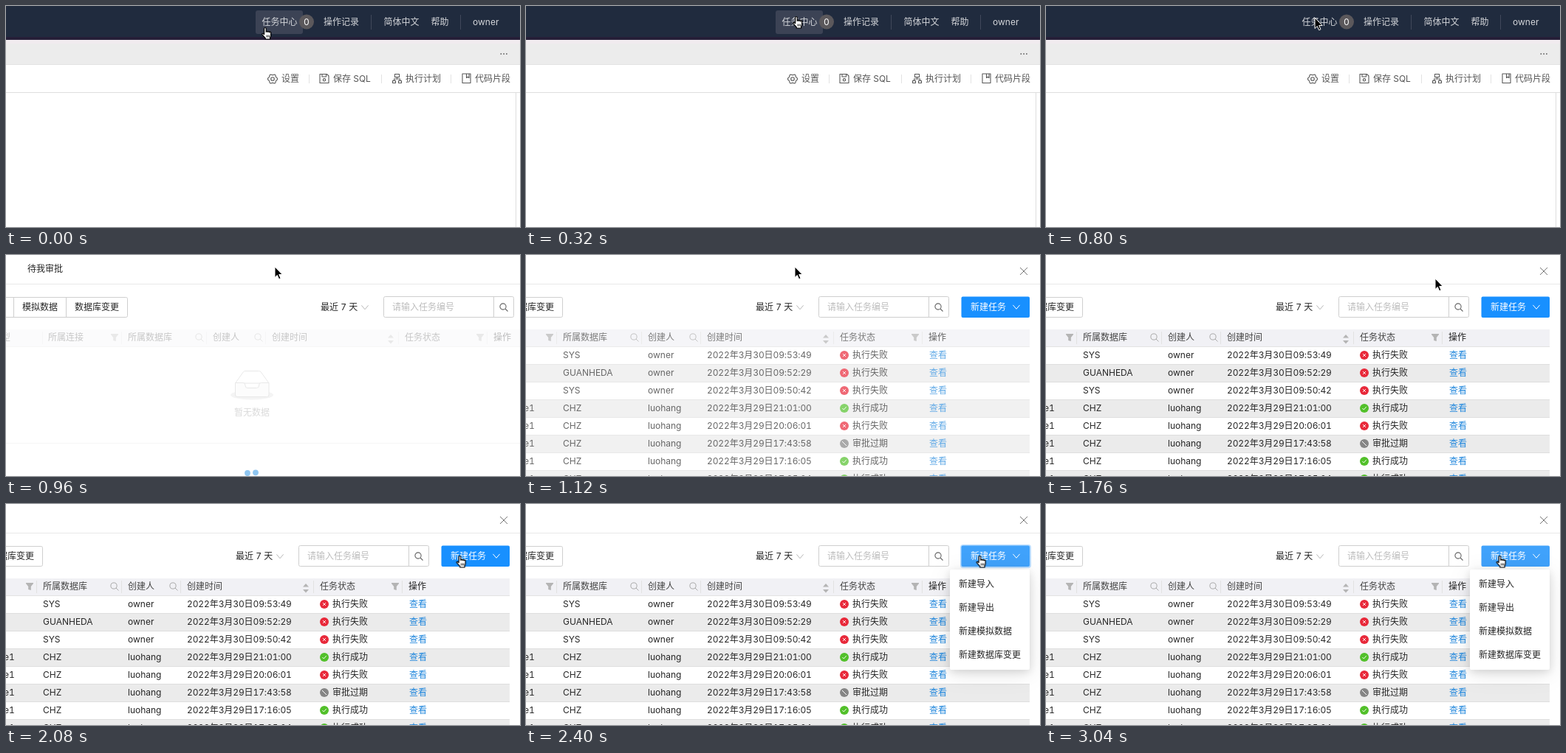
An HTML page that plays this animation: 696 px wide and 300 px high, repeating every 3.2 s.

```html
<!DOCTYPE html>
<html lang="zh-CN">
<head>
<meta charset="utf-8">
<title>任务中心</title>
<style>
html, body { margin: 0; width: 100%; height: 100%; overflow: hidden; background: #fff; }
svg { display: block; }
text { font: 12px Inter, "Noto Sans CJK SC", "Noto Sans CJK", sans-serif; font-feature-settings: "tnum"; }
.ln { fill: none; stroke: #595959; stroke-width: 1.1; stroke-linejoin: round; }
.box { fill: #fff; stroke: #cfcfcf; }
.nav { fill: #d3d5d9; }
.tool { fill: #555; }
.dark { fill: #262626; }
.head { fill: #444; }
.date { letter-spacing: -.1px; }

.anim { animation: 3.2s step-end infinite; }
#hover { animation-name: hover; }
#tasks { animation-name: tasks; }
#page { animation-name: scroll; }
#table { animation-name: fade; }
#rows { animation-name: rows; }
#empty { animation-name: empty; }
#ring { animation-name: ring; }
#new { fill: #1890ff; animation-name: button; }
#menu { transform-origin: 628px 89px; animation-name: menu; }
#panel { fill: #fff; filter: drop-shadow(0 3px 6px rgba(0,0,0,.12)) drop-shadow(0 5px 14px rgba(0,0,0,.1)); }
#hand { animation-name: hand; }
#arrow { animation-name: arrow; }

@keyframes hover { 0% { opacity: 1 } 25%, 100% { opacity: 0 } }
@keyframes tasks { 0% { opacity: 0 } 30%, 100% { opacity: 1 } }
@keyframes scroll { 0% { transform: translate(115px, 0) } 35%, 100% { transform: none } }
@keyframes fade { 0% { opacity: .3 } 35% { opacity: .7 } 40%, 100% { opacity: 1 } }
@keyframes rows { 0% { opacity: 0 } 35%, 100% { opacity: 1 } }
@keyframes empty { 0% { opacity: 1 } 35%, 100% { opacity: 0 } }
@keyframes ring {
  0% { opacity: 0 } 70% { opacity: .35 } 75% { opacity: .3 } 80% { opacity: .2 }
  85% { opacity: .12 } 90% { opacity: .06 } 95%, 100% { opacity: 0 }
}
@keyframes button { 0% { fill: #1890ff } 70% { fill: #2c9cff } 75%, 100% { fill: #40a2fb } }
@keyframes menu {
  0% { opacity: 0; transform: scaleY(.8) }
  70% { opacity: .6; transform: scaleY(.93) }
  75%, 100% { opacity: 1; transform: none }
}
@keyframes hand {
  0% { opacity: 1; transform: translate(346px, 29px) }
  5% { opacity: 1; transform: translate(370px, 16px) }
  10% { opacity: 1; transform: translate(361px, 14px) }
  25% { opacity: 0; transform: translate(361px, 14px) }
  65%, 100% { opacity: 1; transform: translate(609.5px, 70px) }
}
@keyframes arrow {
  0% { opacity: 0; transform: translate(364px, 16px) }
  25% { opacity: 1; transform: translate(364px, 16px) }
  55% { opacity: 1; transform: translate(527px, 32px) }
  60% { opacity: 1; transform: translate(597px, 60px) }
  65%, 100% { opacity: 0; transform: translate(597px, 60px) }
}
</style>
</head>
<body>
<svg width="696" height="300" viewBox="0 0 696 300">
  <defs>
    <g id="lens" fill="none"><circle cx="-1" cy="-1" r="4.1"/><path d="M2 2 5.5 5.5"/></g>
    <path id="funnel" d="M-5-5H5V-4L1.800 0V5L-1.800 4V0L-5-4Z"/>
    <path id="chevron" d="M-4.600-2.600 0 2.800 4.600-2.600" fill="none"/>
    <g id="fail"><circle r="6" fill="#e8293a"/><path d="M-2-2 2 2M2-2-2 2" stroke="#fff" stroke-width=".9"/></g>
    <g id="ok"><circle r="6" fill="#52c02a"/><path d="M-2.600 0-.7 2 2.700-1.900" fill="none" stroke="#fff" stroke-width=".9"/></g>
    <g id="late"><circle r="6" fill="#858585"/><path d="M-3-3 3 3" stroke="#fff"/></g>
  </defs>

  <!-- editor -->
  <g>
    <path fill="#202b3e" d="M0 0H696V43H0Z"/>
    <path fill="#261f38" d="M0 42H696V46H0Z"/>
    <path fill="#f1ebef" d="M0 46H696V52H0Z"/>
    <path fill="#ececec" d="M0 51H696V80H0Z"/>
    <path stroke="#e3e3e3" d="M0 79.500H696"/>
    <path stroke="#dedede" d="M0 117.500H696M690.500 118V300"/>
    <rect id="hover" class="anim" x="338" y="6" width="64" height="32" rx="3" fill="#3c4355"/>
    <g class="nav">
      <text x="346.5" y="26">任务中心</text><text x="430" y="26">操作记录</text>
      <text x="511.5" y="26">简体中文</text><text x="575.5" y="26">帮助</text>
      <text x="632" y="26">owner</text>
    </g>
    <circle cx="407" cy="21.5" r="10" fill="#5b585b"/>
    <text x="407" y="26" text-anchor="middle" fill="#fff">0</text>
    <path stroke="#40485a" d="M494.500 12V32M615.500 12V32"/>
    <g fill="#666"><circle cx="670.3" cy="65" r=".9"/><circle cx="674.1" cy="65" r=".9"/><circle cx="677.9" cy="65" r=".9"/></g>
    <path stroke="#e3e3e3" d="M410.500 93V105M508.500 93V105M602.500 93V105"/>
    <g class="tool">
      <text x="373" y="103">设置</text><text x="443" y="103">保存 SQL</text>
      <text x="541" y="103">执行计划</text><text x="635" y="103">代码片段</text>
    </g>
    <g class="ln">
      <polygon id="gear"/><circle cx="361" cy="99" r="2.3"/>
      <path d="M425 92.500H434.500L437 95V104.500H425ZM428 92.500V96H433.500V92.500"/><circle cx="431" cy="100.3" r="1.7"/>
      <path d="M526.500 92.500H532.500V96.500H526.500ZM529.500 96.500V99M525.500 101V99H533.500V101M523.500 101.500H527.500V104.500H523.500ZM531.500 101.500H535.500V104.500H531.500Z"/>
      <path d="M618 92H629V104.500H618ZM623.500 92V97.500L625.200 96.200 627 97.500V92"/>
    </g>
  </g>

  <!-- task list -->
  <g id="tasks" class="anim">
    <path fill="#fff" d="M0 0H696V300H0Z"/>
    <path stroke="#e8e8e8" d="M0 39.500H696"/>
    <g id="page" class="anim">
      <text class="dark" x="-86" y="23">待我审批</text>
      <path stroke="#777" d="M669 17 679 27M679 17 669 27"/>
      <rect class="box" x="-300" y="57.5" width="349.5" height="27" rx="2"/>
      <path stroke="#cfcfcf" d="M-104.500 57V85M-33.500 57V85"/>
      <g class="dark">
        <text x="-93" y="75">模拟数据</text><text x="-22" y="75">数据库变更</text>
        <text x="311" y="75">最近 7 天</text>
      </g>
      <use href="#chevron" x="371" y="71" stroke="#b5b5b5"/>
      <rect class="box" x="396.5" y="56.5" width="176" height="28" rx="2"/>
      <path stroke="#cfcfcf" d="M545.500 57V84"/>
      <text x="408" y="75" fill="#bdbdbd">请输入任务编号</text>
      <use href="#lens" x="559" y="71" stroke="#666" stroke-width="1.1"/>
      <rect id="ring" class="anim" x="588" y="55" width="96" height="32" rx="4" fill="#1890ff"/>
      <rect id="new" class="anim" x="589.5" y="56.5" width="92.5" height="28.5" rx="2"/>
      <text x="602" y="75" fill="#fff">新建任务</text>
      <use href="#chevron" x="664" y="70.5" stroke="#fff"/>

      <g id="table" class="anim">
        <path fill="#f1f1f5" d="M-200 101H682V124H-200Z"/>
        <path stroke="#e2e2e2" d="M-200 124.500H682M-65.500 104V121M41.500 104V121M156.500 104V121M236.500 104V121M416.500 104V121M536.500 104V121"/>
        <g class="head">
          <text x="-133" y="116">类型</text><text x="-58" y="116">所属连接</text>
          <text x="50" y="116">所属数据库</text><text x="165" y="116">创建人</text>
          <text x="245" y="116">创建时间</text><text x="425" y="116">任务状态</text>
          <text x="545" y="116" fill="#222" font-weight="500" style="font-weight:500">操作</text>
        </g>
        <g fill="#b4b4b4">
          <use href="#funnel" x="32" y="112"/><use href="#funnel" x="527" y="112"/>
          <path d="M402 112.500 406 108 410 112.500ZM402 116 406 120.500 410 116Z"/>
        </g>
        <g stroke="#aaa"><use href="#lens" x="147" y="112"/><use href="#lens" x="227" y="112"/></g>
        <g id="rows" class="anim"></g>
      </g>
    </g>

    <g id="empty" class="anim">
      <ellipse cx="333" cy="190" rx="29" ry="6.5" fill="#f4f4f4"/>
      <g fill="#fff" stroke="#e8e8e8">
        <path d="M310.500 174 321.500 158.500Q322.500 157.500 324 157.500H342.500Q344 157.500 345 158.500L356 174Z"/>
        <path fill="#fcfcfc" d="M310.500 173.500H321Q324 173.500 324 177T327 180.500H339.500Q342.500 180.500 342.500 177T345.500 173.500H356V190Q356 192.500 353.500 192.500H313Q310.500 192.500 310.500 190Z"/>
      </g>
      <text x="309" y="218" fill="#dadada">暂无数据</text>
      <path stroke="#f5f5f5" d="M0 255.500H696"/>
      <g fill="#8fc6f1"><circle cx="327" cy="296" r="3.9"/><circle cx="338" cy="295.3" r="3.9"/></g>
    </g>

    <g id="menu" class="anim">
      <rect id="panel" x="574" y="89" width="108" height="136" rx="2"/>
      <g class="dark">
        <text x="586" y="113">新建导入</text><text x="586" y="145">新建导出</text>
        <text x="586" y="177">新建模拟数据</text><text x="586" y="209">新建数据库变更</text>
      </g>
    </g>
  </g>

  <!-- pointers -->
  <path id="arrow" class="anim" fill="#000" stroke="#fff" d="M0 0V14.500L3.300 11.400 5.600 16.700 8 15.700 5.700 10.500H10.200Z"/>
  <g id="hand" class="anim">
    <path fill="#fff" stroke="#000" stroke-width="1.2" stroke-linejoin="round" d="M3.600 9.500V1.800a1.300 1.300 0 0 1 2.600 0V6.300a1.100 1.100 0 0 1 2.200 .2a1.100 1.100 0 0 1 2.200 .4a1 1 0 0 1 2 .5V11q0 1.500-1 3V16H5.200V14.600L1 9.800q-.8-1.600 1-1.400Z"/>
    <path stroke="#000" stroke-width=".8" d="M6.900 10.500V13.500M8.700 10.500V13.500M10.400 10.500V13.500"/>
  </g>
</svg>
<script>
const labels = { fail: '执行失败', ok: '执行成功', late: '审批过期' };
const tasks = [
  ['', 'SYS', 'owner', '30日09:53:49', 'fail'],
  ['', 'GUANHEDA', 'owner', '30日09:52:29', 'fail'],
  ['', 'SYS', 'owner', '30日09:50:42', 'fail'],
  ['e1', 'CHZ', 'luohang', '29日21:01:00', 'ok'],
  ['e1', 'CHZ', 'luohang', '29日20:06:01', 'fail'],
  ['e1', 'CHZ', 'luohang', '29日17:43:58', 'late'],
  ['e1', 'CHZ', 'luohang', '29日17:16:05', 'ok'],
  ['e1', 'CHZ', 'luohang', '29日17:05:04', 'ok']
];
const cell = (x, y, str, kind = 'dark') => `<text class="${kind}" x="${x}" y="${y}">${str}</text>`;

document.getElementById('rows').innerHTML = tasks.map(([conn, db, user, time, state], i) => {
  const top = 124 + i * 24, y = top + 16;
  const stripe = i % 2
    ? `<path fill="#ebebeb" d="M-200 ${top}H682V${top + 24}H-200Z"/>
       <path stroke="#dedede" d="M-200 ${top + .5}H682M-200 ${top + 24.5}H682"/>`
    : '';
  return stripe + cell(-3, y, conn) + cell(50, y, db) + cell(165, y, user) +
    cell(245, y, '2022年3月' + time, 'dark date') +
    `<use href="#${state}" x="431" y="${top + 12}"/>` +
    cell(442, y, labels[state]) +
    `<text x="546" y="${y}" fill="#1f86dc">查看</text>`;
}).join('');

const gear = Array.from({ length: 48 }, (_, i) => {
  const a = i * Math.PI / 24, r = 5.9 + .7 * Math.cos(6 * a);
  return (361 + r * Math.cos(a)).toFixed(2) + ',' + (99 + r * Math.sin(a)).toFixed(2);
});
document.getElementById('gear').setAttribute('points', gear.join(' '));
</script>
</body>
</html>
```
